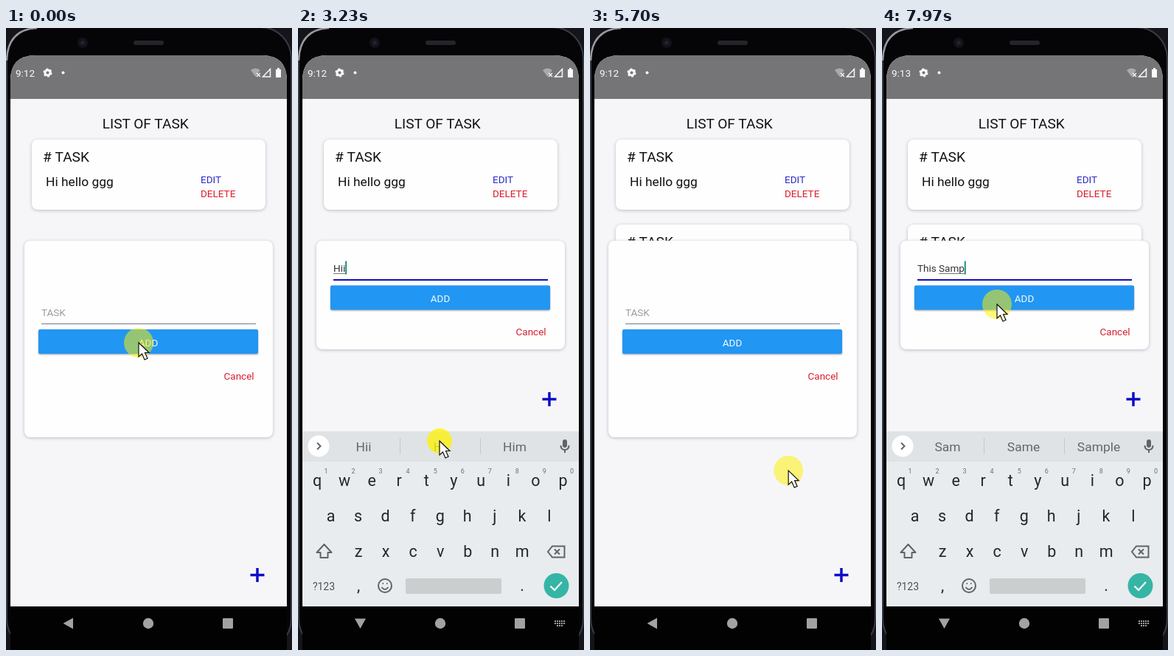
An HTML page for the animation above (8 s loop, 388 by 842 pixels).

```html
<!DOCTYPE html>
<html lang="en">
<head>
<meta charset="utf-8">
<title>List of task</title>
<style>
  html, body { margin: 0; width: 100%; height: 100%; overflow: hidden; background: #14141a; }
  svg { display: block; width: 100vw; height: 100vh; }
  text { font-family: Roboto, Arial, sans-serif; font-size: 13.5px; fill: #111; white-space: pre; }
  .head { font-size: 19.1px; }
  .body { font-size: 17.4px; }
  .mid { text-anchor: middle; }
  .edit { fill: #2c2cc4; }
  .red { fill: #d81e2c; }
  .panel { fill: #fefefe; filter: drop-shadow(0 1px 2px #b9b9c2); }
  .line { fill: none; stroke: #5f6468; stroke-width: 2; }
  .key { font-size: 21.5px; fill: #23282b; text-anchor: middle; }
  .digit { font-size: 9px; fill: #6b7074; text-anchor: middle; }
  .word { font-size: 17.4px; fill: #62676b; text-anchor: middle; }
</style>
</head>
<body>
<svg viewBox="0 0 388 842">
  <defs>
    <g id="card">
      <rect class="panel" x="35" y="151" width="317" height="95" rx="8"/>
      <text class="head" x="50" y="181">#&#160;TASK</text>
      <text class="edit" x="264" y="210">EDIT</text>
      <text class="red" x="264" y="228.5">DELETE</text>
    </g>
    <clipPath id="glass"><path d="M6 842V71Q6 37 40 37H347Q381 37 381 71V842Z"/></clipPath>
  </defs>

  <rect x="1" y="-1" width="386" height="843" rx="42" fill="#050508" stroke="#3a3a44" stroke-width="2"/>
  <path d="M1 44Q2 2 42 0" fill="none" stroke="#98989e" stroke-width="2.5"/>
  <circle cx="104" cy="20" r="7" fill="#12121a"/>
  <circle cx="104" cy="20" r="3" fill="#22222e"/>
  <rect x="173" y="17" width="41" height="6" rx="3" fill="#24242a"/>

  <g clip-path="url(#glass)">
    <rect x="6" y="37" width="375" height="747" fill="#f6f6f9"/>
    <rect x="6" y="37" width="375" height="59" fill="#757577"/>
    <g fill="#fafafa">
      <text id="clock" x="13" y="65.5" style="fill:#fafafa"></text>
      <circle cx="56.5" cy="60.5" r="3.6" fill="none" stroke="#fafafa" stroke-width="3"/>
      <circle cx="56.5" cy="60.5" r="5.3" fill="none" stroke="#fafafa" stroke-width="1.6" stroke-dasharray="2.8 2.75"/>
      <circle cx="77.5" cy="60.5" r="2"/>
      <path d="M332 57Q338.5 52 345 57L338.5 66Z" fill="#aaaaac"/>
      <path d="M340 61l5 5m0-5l-5 5" stroke="#fafafa" stroke-width="1.3"/>
      <path d="M348.5 66H358.5V55.5Z" fill="none" stroke="#fafafa" stroke-width="1.5"/>
      <path d="M366 56h2v-2h3v2h2v11h-7z"/>
    </g>

    <text class="head mid" x="189.2" y="136">LIST OF TASK</text>
    <use href="#card"/>
    <text class="body" x="54" y="214">Hi hello ggg</text>
    <g id="second" transform="translate(0 115)">
      <use href="#card"/>
      <text class="body" x="54" y="214">Hii</text>
    </g>
    <path id="plus" d="M331.500 740.500h19m-9.500 -9.500v19" stroke="#0c0cc8" stroke-width="3.500"/>

    <g id="modal">
      <rect id="sheet" class="panel" x="25" y="288" width="337" rx="8"/>
      <g id="form">
        <text id="hint" x="48" y="389.500" style="fill:#9c9c9c">TASK</text>
        <text id="input" x="48" y="389.500" style="fill:#333"><tspan id="done"></tspan><tspan id="now"></tspan></text>
        <rect id="underline" y="391.500" height="1" fill="#777"/>
        <rect id="caret" y="375" width="1.800" height="18" fill="#0d8778"/>
        <rect id="rule" x="48" width="291"/>
        <rect x="44" y="408" width="298" height="33" rx="2" fill="#2196f3" style="filter:drop-shadow(0 1px 1px #9c9ca4)"/>
        <text class="mid" x="193" y="430.500" style="fill:#f4f8fc">ADD</text>
        <text class="red" x="295.500" y="475.500">Cancel</text>
      </g>
    </g>

    <g id="board">
      <rect x="6" y="546" width="375" height="260" fill="#e8ecef"/>
      <rect x="6" y="546" width="375" height="41" fill="#dfe3e6"/>
      <circle cx="28" cy="566" r="14.500" fill="#fff"/>
      <path id="chevron" class="line" d="M2 -4.500L-2.500 0L2 4.500"/>
      <g id="tools" class="line">
        <circle cx="76" cy="564" r="5"/><path d="M80 568l6 6"/>
        <path d="M127 559h10q2 0 2 2v7l-4 5h-8q-2 0-2-2v-10q0-2 2-2zM128 566q4 5 8 0"/>
        <text class="mid" x="186" y="571" style="font-weight:900;font-size:13px;fill:#5f6468;stroke:none">GIF</text>
        <rect x="235" y="559" width="14" height="14" fill="#5f6468" stroke="none"/>
        <path d="M275 557v18" stroke="#cdd1d4" stroke-width="1"/>
        <path d="M302 566h14" stroke-width="3.500" stroke-linecap="round" stroke-dasharray="0 6.500"/>
      </g>
      <g id="words">
        <path d="M138.500 555v22M247.500 555v22" stroke="#c4c8cb"/>
        <text class="word" x="89" y="572.500"></text>
        <text class="word" x="192" y="572.500"></text>
        <text class="word" x="294" y="572.500"></text>
      </g>
      <rect x="359" y="557" width="6" height="11" rx="3" fill="#5f6468"/>
      <path class="line" d="M356.500 565q0 6 5.500 6t5.500-6M362 571v4" stroke-width="1.600"/>
      <g id="keys"></g>
      <path id="shift" class="line" transform="translate(35.500 709)" d="M0-10L10 1H5V8H-5V1H-10Z" stroke-linejoin="round"/>
      <path class="line" d="M345 701.500h16.500v15H345l-6-7.500zM348 705.500l7 7m0-7l-7 7" stroke-width="1.800"/>
      <text class="mid" x="35" y="760.500" style="font-size:14px;fill:#4d5256">?123</text>
      <text class="key" x="82" y="762">,</text>
      <text class="key" x="304" y="762">.</text>
      <circle class="line" cx="118" cy="755" r="9"/>
      <path class="line" d="M113.500 757q4.500 6 9 0M114.500 752h1.500m4 0h1.500"/>
      <rect x="146" y="745" width="130" height="21" rx="2" fill="#cacecf"/>
      <circle id="enter" cx="350.500" cy="755" r="17"/>
      <path d="M342.500 755.500l5.500 5.500l10-11" fill="none" stroke="#fcfcfc" stroke-width="2.200"/>
    </g>

    <rect id="navbar" x="6" width="375" height="60" fill="#020203"/>
    <g fill="#a2a2a2">
      <path id="back" d="M-7 0L6.500-7.500V7.500Z"/>
      <circle cx="193" cy="806" r="7.200"/>
      <rect x="294" y="799" width="14" height="14" rx="1"/>
      <path id="swap" d="M348 803h15M348 806h15M351 809h9" stroke="#a2a2a2" stroke-width="2" stroke-dasharray="2 1"/>
    </g>
  </g>

  <g id="mouse">
    <circle id="halo" fill="#fff200"/>
    <path d="M0 0V19L4.500 15L8 23L12 21.300L8.500 13.500H14Z" fill="#fff" stroke="#111" stroke-width="1.200"/>
  </g>
</svg>

<script>
const el = {};
document.querySelectorAll('[id]').forEach(e => el[e.id] = e);
const LOOP = 8000, ADDED = 4150, REOPEN = 5320;
const sessions = [{ show: 430, hide: ADDED }, { show: 6114, hide: Infinity }];
const presses = [430, 3230, ADDED, REOPEN, 6114];

// time, x, y
const path = [
  [0, 180, 426], [170, 180, 426], [410, 159, 370], [1000, 159, 370], [1650, 318, 803],
  [2500, 318, 803], [3180, 192, 559], [3300, 192, 559], [3900, 188, 366], [4470, 188, 366],
  [4970, 337, 778], [5250, 341, 742], [5480, 341, 742], [6000, 156, 374], [LOOP, 156, 374]
];

// time, text, suggestions
const typing = [
  [0, ''], [850, 'H', 'H He Hi'], [1050, 'Hi', 'Hi Hii Him'], [1250, 'Hii', 'Hii Hi Him'], [ADDED, '']
];
const guesses = ['T The This', 'Th The This', 'Thi This Think', 'This Thus Thistle', 'is was one',
  'So She Same', 'Sa Same Say', 'Sam Same Sample', 'Sam Same Sample'];
guesses.forEach((g, i) => typing.push([6450 + i * 170, 'This Samp'.slice(0, i + 1), g]));

function addText(cls, x, y, value) {
  const node = document.createElementNS('http://www.w3.org/2000/svg', 'text');
  node.setAttribute('class', cls);
  node.setAttribute('x', x);
  node.setAttribute('y', y);
  node.textContent = value;
  el.keys.append(node);
  return node;
}
const letters = [];
[['qwertyuiop', 26], ['asdfghjkl', 44.5], ['zxcvbnm', 82]].forEach(([row, x0], r) =>
  [...row].forEach((c, i) => {
    const x = x0 + i * 37.05;
    letters.push(addText('key', x, 619.5 + r * 48, c));
    if (!r) addText('digit', x + 12, 603, (i + 1) % 10);
  }));
const words = el.words.querySelectorAll('text');

const set = (e, name, value) => e.setAttribute(name, value);
const move = (e, x, y, extra = '') => set(e, 'transform', `translate(${x} ${y}) ${extra}`);
const show = (e, on) => e.style.display = on ? '' : 'none';
const clamp = v => Math.min(1, Math.max(0, v));

function mouseAt(t) {
  const i = path.findIndex(p => p[0] > t), a = path[i - 1], b = path[i];
  const p = (t - a[0]) / (b[0] - a[0]), e = p * p * (3 - 2 * p);
  return [a[1] + (b[1] - a[1]) * e, a[2] + (b[2] - a[2]) * e];
}

// How far the keyboard sits below its resting place
function keyboardDrop(t) {
  const s = sessions.findLast(s => t >= s.show);
  if (!s) return 245;
  if (t >= s.hide) return 245 * clamp((t - s.hide) / 150) ** 2;
  return 240 * (1 - clamp((t - s.show) / 250)) ** 3;
}

function draw(t) {
  const focused = sessions.some(s => t >= s.show && t < s.hide);
  const drop = keyboardDrop(t), compact = focused && drop < 6;
  const [, text, guess] = typing.findLast(k => t >= k[0]);
  const upper = !text;

  el.clock.textContent = t < 7000 ? '9:12' : '9:13';
  show(el.second, t >= ADDED);
  move(el.plus, 0, compact ? -238 : 0);

  show(el.modal, t < ADDED || t >= REOPEN);
  set(el.sheet, 'height', compact ? 147 : 266);
  move(el.form, 0, compact ? -59.5 : 0);
  const cut = text.lastIndexOf(' ') + 1;
  el.done.textContent = text.slice(0, cut);
  el.now.textContent = text.slice(cut);
  const before = el.done.getComputedTextLength(), width = el.now.getComputedTextLength();
  set(el.underline, 'x', 48 + before);
  set(el.underline, 'width', width);
  show(el.hint, !text);
  show(el.caret, focused);
  set(el.caret, 'x', 48 + before + width);
  set(el.rule, 'y', focused ? 399.5 : 400);
  set(el.rule, 'height', focused ? 2 : 1);
  set(el.rule, 'fill', focused ? '#1010b8' : '#77778c');

  show(el.board, drop < 245);
  move(el.board, 0, drop);
  show(el.tools, upper);
  show(el.words, !upper);
  if (guess) guess.split(' ').forEach((w, i) => words[i].textContent = w);
  move(el.chevron, 28, 566, upper ? '' : 'scale(-1 1)');
  letters.forEach(k => k.textContent = upper ? k.textContent.toUpperCase() : k.textContent.toLowerCase());
  el.shift.style.fill = upper ? '#5f6468' : 'none';
  set(el.enter, 'fill', upper ? '#5fb9b2' : '#35b5a5');

  set(el.navbar, 'y', 783 + (drop < 245 ? Math.min(drop, 8) : 0));
  move(el.back, 84.5, 806, focused ? 'rotate(-90)' : '');
  show(el.swap, focused);

  const pressed = presses.some(p => Math.abs(t - p) < 80);
  set(el.halo, 'r', pressed ? 17 : 20);
  set(el.halo, 'fill-opacity', pressed ? .75 : .52);
  move(el.mouse, ...mouseAt(t));
}

const start = performance.now();
function tick() {
  draw((performance.now() - start) % LOOP);
  requestAnimationFrame(tick);
}
tick();
</script>
</body>
</html>
```
